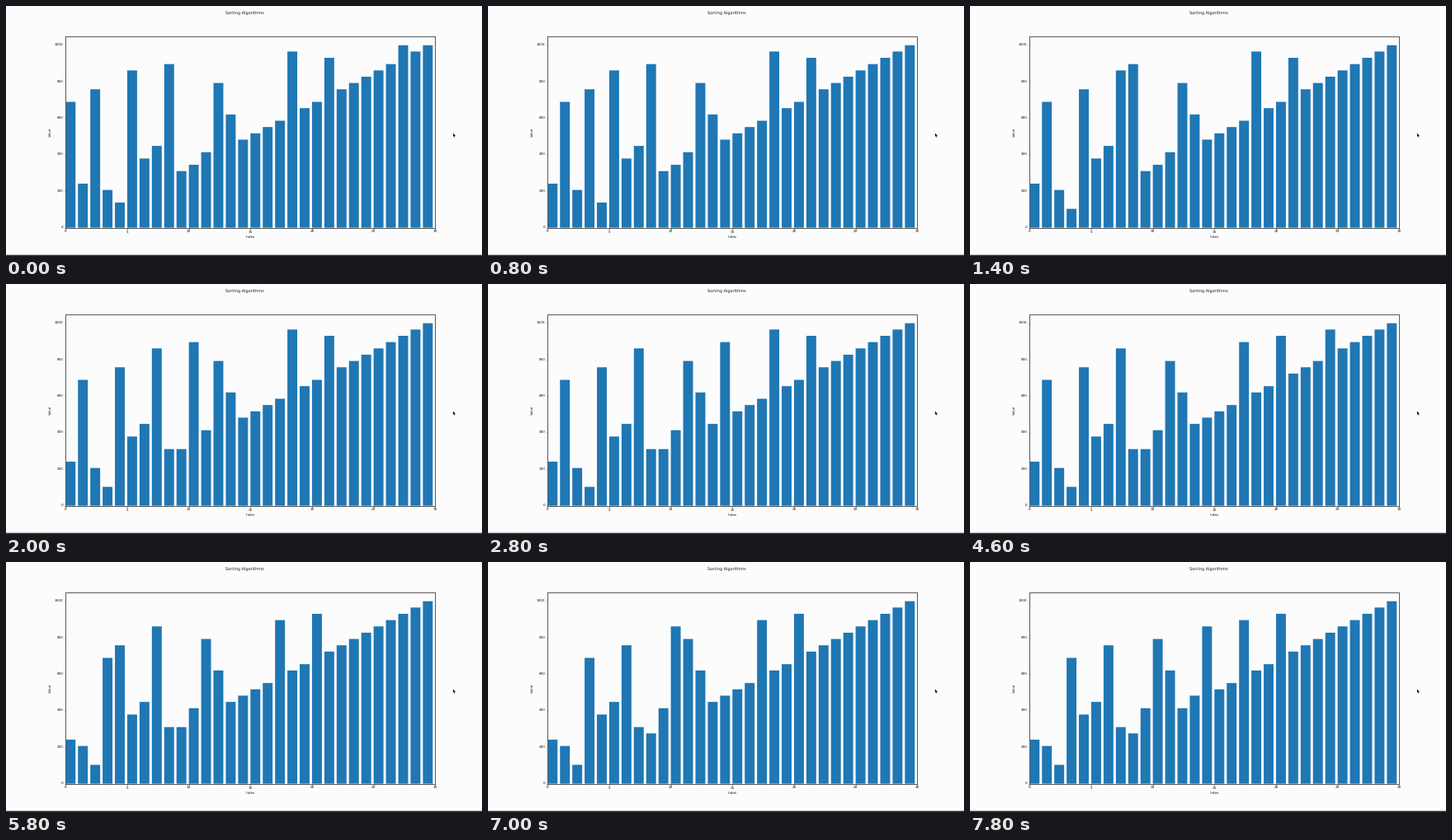
Write a matplotlib script that moves like this. It is 577 by 304 pixels and loops after 8 s.

```python
import numpy as np
import matplotlib.pyplot as plt
from matplotlib.animation import FuncAnimation
from matplotlib.patches import Polygon, Rectangle

W, H, DPI = 577, 304, 100
FRAMES, INTERVAL = 40, 200
N = 30
STEP = 1000 / (N - 1)
PAUSES = {8, 30}
INK, LINE = "#1c1c1c", "#585858"

# Ranks of the bars, late in the first bubble pass.
START = [20, 7, 22, 6, 3, 25, 11, 13, 26, 9, 8, 12, 23, 18, 10,
         14, 15, 16, 28, 17, 19, 27, 21, 1, 4, 24, 2, 29, 5, 0]
START_POS = 27


def bubble(ranks, pos):
    """Yield the list after every swap, starting in mid pass at pos."""
    a = list(ranks)
    for end in range(N - 1, 0, -1):
        for j in range(pos, end):
            if a[j] > a[j + 1]:
                a[j], a[j + 1] = a[j + 1], a[j]
                yield list(a)
        pos = 0


def build_states():
    swaps = bubble(START, START_POS)
    states = [list(START)]
    for k in range(1, FRAMES):
        states.append(states[-1] if k in PAUSES else next(swaps))
    # A sorted set of bars stays behind, so no bar drops below its index.
    return np.maximum(states, np.arange(N)) * STEP


def pt(px):
    return px * 72 / DPI


plt.rcParams.update({"font.family": "DejaVu Sans", "text.hinting": "none",
                     "toolbar": "None"})
fig = plt.figure(figsize=(W / DPI, H / DPI), dpi=DPI, facecolor="#fdfcfd")

left, right, top, bottom = 72.3, 520.3, 36.6, 269.6
ax = fig.add_axes([left / W, 1 - bottom / H, (right - left) / W, (bottom - top) / H],
                  facecolor="#fdfcfd")
ax.set_xlim(0, N)
ax.set_ylim(0, 1050)
ax.set_xticks(range(0, N + 1, 5))
ax.set_yticks(range(0, 1001, 200))
ax.tick_params(length=pt(1.5), pad=pt(1.5), width=pt(0.8), color=LINE,
               labelsize=pt(4.17), labelcolor=INK)
for spine in ax.spines.values():
    spine.set(linewidth=pt(1), color=LINE)


def label(x, y, text, size, **kw):
    fig.text(x / W, 1 - y / H, text, fontsize=pt(size), color=INK,
             ha="center", va="center", **kw)


label(289, 8.4, "Sorting Algorithms", 5)
label(296.3, 281, "Index", 4.17)
label(54, 153.3, "Value", 4.17, rotation=90)

# Screen edge and mouse pointer, in pixels from the top left.
screen = fig.add_axes([0, 0, 1, 1])
screen.set_xlim(0, W)
screen.set_ylim(H, 0)
screen.axis("off")
screen.add_patch(Rectangle((0, 302.7), W, 1.3, color="#2b2b2d", lw=0, snap=False))
pointer = np.array([(0, 0), (0, 4.4), (1, 3.5), (1.8, 5.2), (2.5, 4.9),
                    (1.8, 3.3), (3.1, 3.2)])
screen.add_patch(Polygon(pointer + (541.9, 154.6), color="#151515", lw=0))

states = build_states()
bars = ax.bar(range(N), states[0], width=0.8, align="edge", color="#1f77b4")
for bar in bars:
    bar.set_snap(False)


def update(k):
    for bar, height in zip(bars, states[k]):
        bar.set_height(height)
    return bars.patches


anim = FuncAnimation(fig, update, frames=FRAMES, init_func=lambda: update(0),
                     interval=INTERVAL, repeat=True, repeat_delay=0)
plt.show()
```
